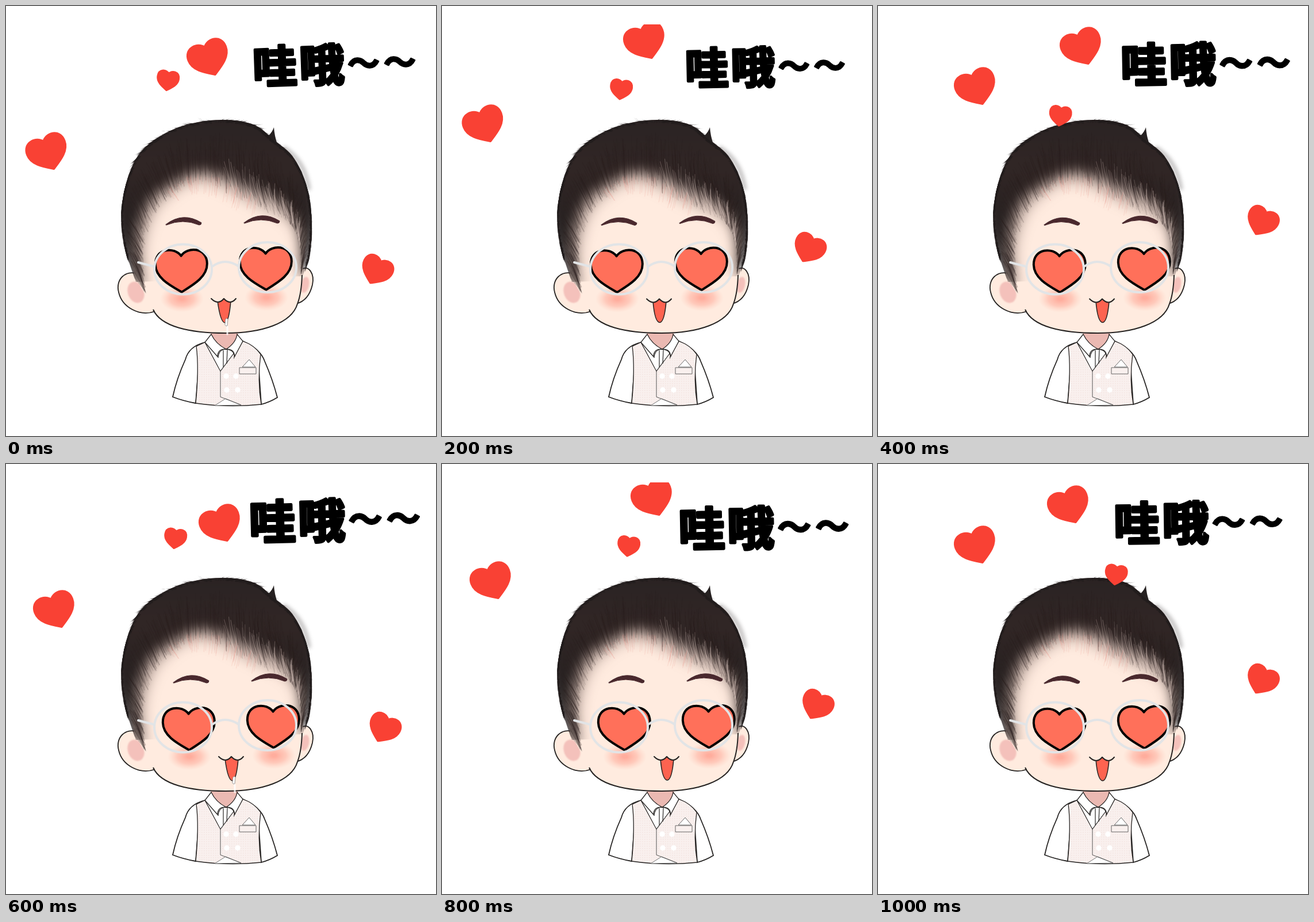
Write an HTML page with a canvas that moves like this. It is 748 px wide and 748 px high and loops after 1200 ms.

```html
<!DOCTYPE html>
<html lang="zh">
<head>
<meta charset="utf-8">
<title>哇哦</title>
<style>
  html, body { margin: 0; height: 100%; overflow: hidden; background: #fff; }
  canvas { display: block; width: 100vw; height: 100vh; }
</style>
</head>
<body>
<canvas id="stage" width="748" height="748"></canvas>
<script>
const SIZE = 748, STEP = 200, TAU = Math.PI * 2, INK = '#252322', RED = '#f94134', SKIN = '#ffebdf';
const stage = document.getElementById('stage').getContext('2d');
const still = document.createElement('canvas');
still.width = still.height = SIZE;

let seed = 7;
const rnd = (a = 0, b = 1) => {
  seed = (seed * 1664525 + 1013904223) % 4294967296;
  return a + (b - a) * seed / 4294967296;
};

function shape(g, d, fill, stroke, width = 1.8) {
  const p = new Path2D(d);
  if (fill) { g.fillStyle = fill; g.fill(p); }
  if (stroke) { g.strokeStyle = stroke; g.lineWidth = width; g.stroke(p); }
}

function disc(g, x, y, rx, ry, fill, turn = 0) {
  g.beginPath();
  g.ellipse(x, y, rx, ry, turn, 0, TAU);
  g.fillStyle = fill;
  g.fill();
}

// ---------- hair ----------
// Crown edge and hairline, both from the left ear over the top to the right ear.
const CROWN = [[226, 480], [207, 420], [201, 355], [215, 290], [243, 245], [300, 211], [370, 198],
  [430, 206], [467, 234], [499, 262], [522, 310], [531, 370], [528, 430], [516, 470]];
const LINE = [[243, 499], [238, 440], [244, 395], [261, 354], [287, 328], [312, 312], [345, 306],
  [385, 320], [420, 339], [455, 354], [482, 366], [502, 387], [511, 420], [513, 465]];

function along(pts, t) {
  const u = Math.max(0, Math.min(1, t)) * (pts.length - 1), i = Math.min(Math.floor(u), pts.length - 2), f = u - i;
  const [a, b, c, d] = [-1, 0, 1, 2].map(k => pts[Math.max(0, Math.min(pts.length - 1, i + k))]);
  return [0, 1].map(k => b[k] + f / 2 * (c[k] - a[k] +
    f * (2 * a[k] - 5 * b[k] + 4 * c[k] - d[k] + f * (3 * (b[k] - c[k]) + d[k] - a[k]))));
}

function hairAt(t, depth) {
  const a = along(CROWN, t), b = along(LINE, t);
  return [a[0] + (b[0] - a[0]) * depth, a[1] + (b[1] - a[1]) * depth];
}

function trace(g, depth, back) {
  for (let i = 0; i <= 90; i++) {
    const t = back ? 1 - i / 90 : i / 90;
    g.lineTo(...hairAt(t, depth(t)));
  }
}

function strand(g, t, from, to, sweep, color, width) {
  g.strokeStyle = color;
  g.lineWidth = width;
  g.beginPath();
  g.moveTo(...hairAt(t, from));
  g.quadraticCurveTo(...hairAt(t + sweep * .35, (from + to) / 2), ...hairAt(t + sweep, to));
  g.stroke();
}

function hair(g) {
  g.save();
  g.filter = 'blur(3px)';
  shape(g, 'M482 246C508 262 522 285 527 320', null, 'rgba(70,65,65,.3)', 8);
  g.restore();

  g.save();
  g.beginPath();
  trace(g, () => 0);
  g.clip();
  const layer = (inner, blur, color) => {
    g.filter = `blur(${blur}px)`;
    g.beginPath();
    trace(g, () => -.35);
    trace(g, inner, true);
    g.fillStyle = color;
    g.fill();
  };
  const tone = g.createLinearGradient(0, 200, 0, 400);
  tone.addColorStop(0, '#2a2323');
  tone.addColorStop(.4, '#312625');
  tone.addColorStop(1, '#241f1f');
  layer(() => .98, 12, 'rgba(95,75,70,.5)');
  layer(t => Math.min(.82, .48 + t * 1.1, 1.1 - t * .48), 10, tone);
  g.restore();

  g.lineCap = 'round';
  for (let i = 0; i < 560; i++) {
    const t = rnd(.03, .95), sweep = (t - .4) * (t > .4 && t < .75 ? .45 : .1);
    strand(g, t, rnd(.2, .6), rnd(.75, 1.05), sweep, `rgba(42,31,30,${rnd(.1, .28)})`, rnd(.6, 1.6));
  }
  for (let i = 0; i < 60; i++)
    strand(g, rnd(.3, .65), rnd(.85, .95), rnd(1, 1.2), .01, 'rgba(238,150,138,.18)', 1.2);
  for (let i = 0; i < 80; i++)
    strand(g, rnd(.5, .86), rnd(.55, .75), rnd(.9, 1.05), .06, 'rgba(255,232,222,.22)', rnd(.6, 1.3));

  // Tapered tips around the crown, combed away from the top.
  for (let i = 0; i < 300; i++) {
    const t = rnd(.05, .95), a = along(CROWN, t - .012), b = along(CROWN, t + .012);
    const n = Math.hypot(b[0] - a[0], b[1] - a[1]) || 1;
    const ux = (b[0] - a[0]) / n, uy = (b[1] - a[1]) / n, way = t < .46 ? -1 : 1;
    const top = t > .25 && t < .63, len = rnd(9, top ? 24 : 18), out = top ? rnd(.1, .42) : rnd(0, .14);
    const [x, y] = hairAt(t, .03);
    const tx = x + len * (ux * way + uy * out), ty = y + len * (uy * way - ux * out);
    g.fillStyle = `rgba(34,29,29,${rnd(.35, .85)})`;
    g.beginPath();
    g.moveTo(x + uy * 1.5, y - ux * 1.5);
    g.quadraticCurveTo(x + ux * way * len * .5 + uy * 2, y + uy * way * len * .5 - ux * 2, tx, ty);
    g.lineTo(x - uy * 2.5, y + ux * 2.5);
    g.fill();
  }
  shape(g, 'M456 226Q463 220 466 211Q467 226 472 240Z', '#262121');
  for (let i = 0; i < 12; i++)
    shape(g, `M${211 + i * 1.7} ${425 + i}Q${219 + i} 462 ${224 + i * 1.7} ${474 + i * 2.1}`, null, 'rgba(50,42,42,.28)', 1);
}

// ---------- unmoving figure ----------
function body(g) {
  shape(g, 'M357 566L354 582L380 606L408 582L402 566Z', '#ebb9b2');
  shape(g, 'M346 585Q318 592 312 615Q297 648 290 680Q308 687 330 691L337 600ZM412 583Q443 597 450 618Q464 650 472 681Q459 689 444 693L438 606Z', '#fff', INK);
  const vest = 'M346 585L331 592Q336 630 330 691Q386 699 444 693Q437 650 443 606Q432 590 412 583L373 635Z';
  shape(g, vest, '#f9f0ee');
  g.save();
  g.clip(new Path2D(vest));
  g.fillStyle = '#f4e5e2';
  for (let y = 584; y < 698; y += 4)
    for (let x = 328; x < 446; x += 4) g.fillRect(x, y, 1.6, 1.6);
  g.restore();
  shape(g, vest, null, INK, 1.3);
  shape(g, 'M347 584L373 634L411 584L384 598Z', '#fff');
  shape(g, 'M363 695L382 683L409 694Z', '#fff', '#777', 1);
  shape(g, 'M411 584L373 635V680L409 694', null, '#555', 1);
  shape(g, 'M357 571L346 585L368 610Q368 596 383 597Q399 597 397 611L412 583L402 571Q400 586 383 597Q365 588 357 571Z', '#fff', INK, 1.3);
  shape(g, 'M369 612Q370 597 383 597Q396 598 398 610M378 599V628M385 598L384 622', null, INK, 1.2);
  for (const [x, y] of [[383, 644], [400, 644], [384, 668], [403, 668]]) disc(g, x, y, 4.7, 4.7, '#fff');
  shape(g, 'M411 628L423 615L434 628Z', '#fff', '#666', 1);
  shape(g, 'M406 629H435V640H406Z', '#f9f0ee', '#666', 1);
}

function head(g) {
  shape(g, 'M229 466C208 458 190 476 196 498C202 524 232 541 260 531L250 480Z', SKIN, INK);
  shape(g, 'M514 458C527 450 537 466 533 485C529 502 520 514 505 518Z', SKIN, INK);
  g.save();
  g.filter = 'blur(1px)';
  disc(g, 226, 498, 14, 19, '#f4c1bb', -.35);
  disc(g, 520, 485, 7, 14, '#f4c1bb', .2);
  g.restore();
  shape(g, 'M224 470L208 400L218 300L300 222L430 215L508 290L525 390L515 468Q514 500 507 518C497 552 445 569 382 569C320 569 270 558 257 528Z', SKIN);
  shape(g, 'M256 528C269 558 320 569 382 569C445 569 497 552 507 518Q514 500 515 468', null, INK, 2);
}

const back = still.getContext('2d');
body(back);
head(back);
hair(back);

// ---------- moving parts ----------
function heart(g, x, y, w, h, turn, fill, stroke = fill) {
  g.save();
  g.translate(x, y);
  g.rotate(turn * TAU / 360);
  g.scale(w, h);
  g.beginPath();
  g.moveTo(0, -.64);
  g.bezierCurveTo(-.24, -1.05, -1, -1.02, -1, -.28);
  g.bezierCurveTo(-1, .3, -.46, .64, 0, .95);
  g.bezierCurveTo(.46, .64, 1, .3, 1, -.28);
  g.bezierCurveTo(1, -1.02, .24, -1.05, 0, -.64);
  g.closePath();
  g.restore();
  g.fillStyle = fill;
  g.fill();
  g.strokeStyle = stroke;
  g.lineWidth = 4;
  g.lineJoin = 'round';
  g.stroke();
}

function face(g, dx, dy, drool) {
  g.save();
  g.translate(dx, dy);
  for (const [x, y] of [[306, 509], [453, 507]]) {
    g.save();
    g.translate(x, y);
    g.scale(1, .62);
    const glow = g.createRadialGradient(0, 0, 4, 0, 0, 38);
    glow.addColorStop(0, 'rgba(255,140,122,.65)');
    glow.addColorStop(.5, 'rgba(255,160,142,.45)');
    glow.addColorStop(1, 'rgba(255,190,172,0)');
    disc(g, 0, 0, 38, 38, glow);
    g.restore();
  }
  for (const [x, y] of [[278, 380], [414, 377]]) {
    g.save();
    g.translate(x, y);
    shape(g, 'M0 0Q30 -23 62 -3Q62 1 58 1Q30 -11 1 1Z', '#49282d', '#49282d', 1);
    g.restore();
  }
  heart(g, 305, 460, 45, 39.5, -1, '#ff705a', '#000');
  heart(g, 452, 456, 45, 39.5, -1, '#ff705a', '#000');
  shape(g, drool ? 'M368 513Q373 551 381 551Q388 549 391 513L378 509Z'
                 : 'M368 513Q371 550 380 550Q388 549 391 513L379 509Z', '#fd6350', INK, 1.6);
  shape(g, 'M357 509Q369 522 379 509Q390 522 400 509L379 504Z', SKIN);
  shape(g, 'M357 509Q369 521 379 509Q390 521 400 509', null, INK, 2);
  if (drool) {
    shape(g, 'M382 545Q384 542 386 545L385 556Q383 558 381 555Z', '#fff', '#999', 1);
    shape(g, 'M385 558V571', null, 'rgba(255,255,255,.8)', 3);
  }
  g.restore();
}

function glasses(g) {
  g.lineCap = 'round';
  g.strokeStyle = '#e2e4e6';
  g.lineWidth = 4;
  for (const [x, y] of [[308, 458], [455, 454.5]]) {
    g.beginPath();
    g.ellipse(x, y, 50, 43.5, 0, 0, TAU);
    g.stroke();
  }
  shape(g, 'M359 453Q381 437 405 453M230 446L257 453', null, '#e2e4e6', 4);
}

function cheer(g, x, y, scale, turn) {
  g.save();
  g.translate(x, y);
  g.rotate(turn * TAU / 360);
  g.scale(scale, scale);
  g.fillStyle = g.strokeStyle = '#000';
  g.lineJoin = 'round';
  g.textAlign = 'center';
  const put = (text, at, size, bold) => {
    g.font = `900 ${size}px "Noto Sans CJK SC", "Noto Sans CJK", sans-serif`;
    g.lineWidth = bold;
    g.fillText(text, at, size * .38);
    g.strokeText(text, at, size * .38);
  };
  put('哇', 0, 78, 4.5);
  put('哦', 81.5, 78, 4.5);
  put('～', 154, 56, 3);
  put('～', 217, 56, 3);
  g.restore();
}

// Each pose: face shift, four heart centres, then the words' x, y, scale and tilt.
const POSES = [
  { face: [0, 0], hearts: [[353, 91], [72.5, 255], [281.5, 129.5], [644.5, 460]], words: [468, 104.5, 1, -2] },
  { face: [-1, .5], hearts: [[354, 62], [73.5, 207], [311.5, 145], [638.5, 422]], words: [461, 107.5, .982, -1.2] },
  { face: [11, .5], hearts: [[355, 72], [171, 142], [317, 191], [668, 375]], words: [462.5, 102, 1.04, -1] },
  { face: [13, 0], hearts: [[374, 105], [86, 255], [294.5, 129.5], [657.5, 460]], words: [463.5, 100, 1.05, -1.5] },
  { face: [12, 0], hearts: [[367, 60], [87, 205], [324.5, 143], [652, 420]], words: [452, 112.5, 1.045, -1.2] },
  { face: [11, 1], hearts: [[333, 73], [171, 143], [414, 192.5], [668, 376]], words: [450.5, 103, 1.035, -.8] }
];
const HEARTS = [[34.5, 31.5, -21], [34.5, 31.5, -21], [18, 17.5, 8], [26.5, 25, 26]];

function draw(now) {
  const n = Math.floor(now / STEP) % POSES.length, pose = POSES[n], g = stage;
  g.fillStyle = '#fff';
  g.fillRect(0, 0, SIZE, SIZE);
  g.drawImage(still, 0, 0);
  face(g, ...pose.face, n % 3 === 0);
  glasses(g);
  g.save();
  g.beginPath();
  g.rect(0, 32, SIZE, SIZE);
  g.clip();
  pose.hearts.forEach((at, i) => heart(g, ...at, ...HEARTS[i], RED));
  g.restore();
  cheer(g, ...pose.words);
}

function tick() {
  draw(performance.now());
  requestAnimationFrame(tick);
}
tick();
</script>
</body>
</html>
```
